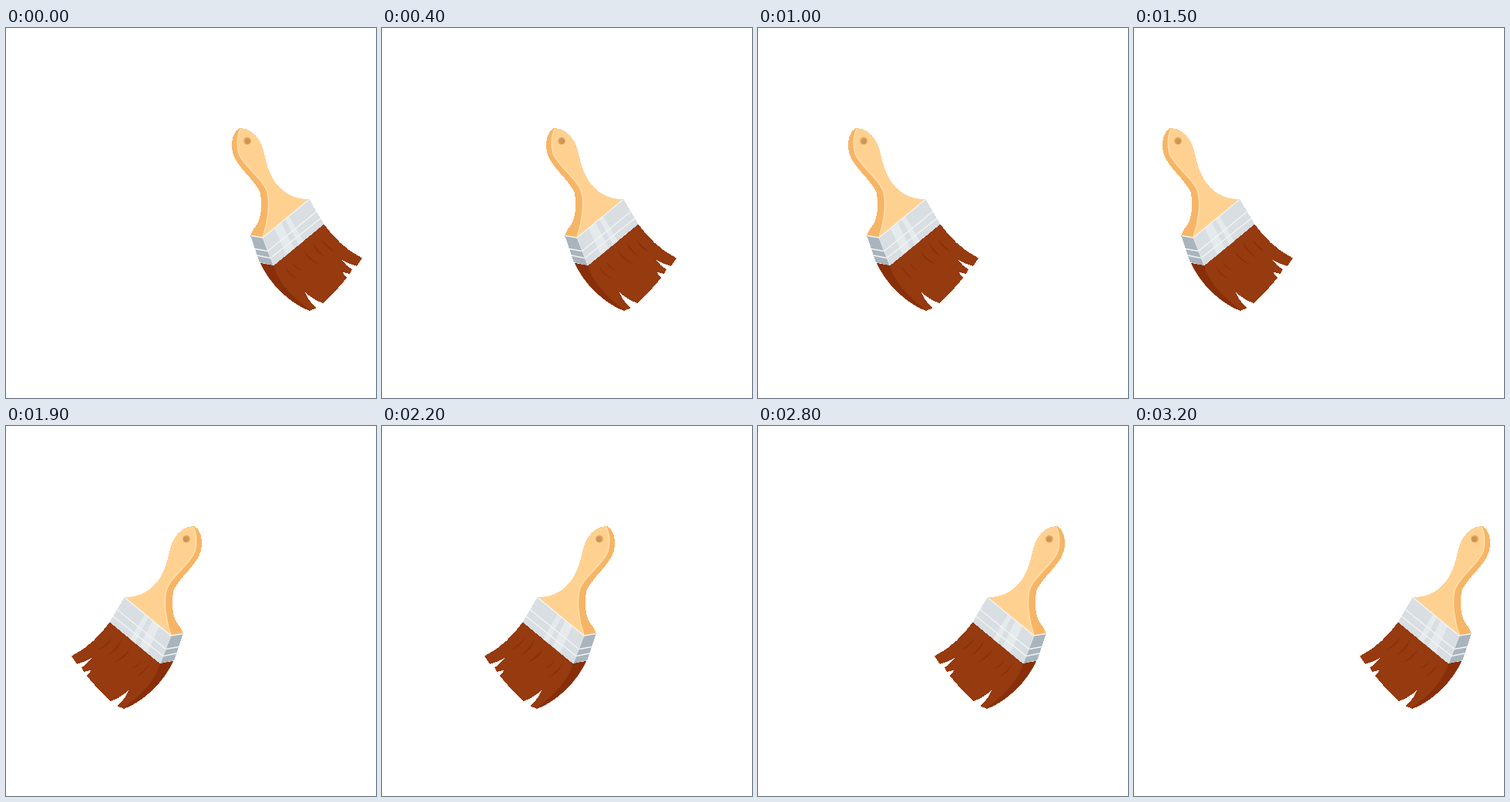
These frames come from a looping animation (480x480 px, 3.3 s). An HTML page:

```html
<!DOCTYPE html>
<html lang="en">
<head>
<meta charset="utf-8">
<title>Paintbrush</title>
<style>
  html, body { margin: 0; width: 100%; height: 100%; overflow: hidden; background: #fff; }
  svg { display: block; width: 100vw; height: 100vh; }
  .edge { shape-rendering: crispEdges; }
</style>
</head>
<body>
<svg viewBox="0 0 480 480">
  <g id="brush">
    <g id="bristles">
      <path class="edge" fill="#963a10" d="M330 305 L347 308 L412 254 C425 272 441 288 462 298.500 L455 309 Q444 306 435 300.500 Q441 308 449 313.500 L446 319 L436 316.500 L442 324 Q428 342 411 357 Q398 352 388 343 Q392 354 403 363 L394 367 C368 357 343 333 330 305Z"/>
      <path fill="#882f09" d="M330 305 L347 308 C353 330 371 348 395 366.500 C368 357 343 333 330 305Z"/>
      <path fill="#86300c" d="M361 308 Q368 319 379 326 Q366 321 361 308Z
        M371 303 Q375 310 385 315 Q374 312 371 303Z
        M386 289 Q394 299 407 307 Q392 302 386 289Z
        M397 277 Q404 289 415 298 Q401 291 397 277Z
        M410 274 Q417 284 428 291 Q414 286 410 274Z"/>
    </g>
    <g id="handle">
      <path class="edge" fill="#f6b566" d="M303 130 C295 133 292 146 293 156 C295 178 321 194 329.500 213 C333 226 331 242 328 250 C324 259 319 261 317 270 L333 272 L393 222 C374 223 357 213 347 197 C335 177 337 162 329 147 C323 136 313 129.500 303 130Z"/>
      <path fill="#ffd191" d="M304 130.500 C300 139 299 152 302 163 C309 180 333 195 339 213 C343 231 339 254 333 272 L393 222 C374 223 357 213 347 197 C335 177 337 162 329 147 C323 136 313 130.500 304 130.500Z"/>
      <path fill="none" stroke="#ffe0ae" stroke-width="1.500" d="M304 131 C300 139 299 152 302 163 C309 180 333 195 339 213 C343 231 339 254 333 271"/>
      <circle cx="313" cy="146.500" r="4.800" fill="#dca561"/>
      <circle cx="313.700" cy="147" r="3.300" fill="#cf9450"/>
    </g>
    <g id="ferrule">
      <path class="edge" fill="#a9b4bc" d="M317 269 L333 272 L347 308 L329 304Z"/>
      <path class="edge" fill="#d8dee2" d="M333 272 L393 221.500 L412.500 254.500 L347 308.500Z"/>
      <path fill="#e5eaed" d="M348 260 L357 252 L374 286 L364 294.500Z M362 248 L367 244 L386 276.500 L380 281.500Z"/>
      <g fill="none" stroke="#f2f5f6" stroke-width="1.500">
        <path d="M318 269.500 L333 272 L393 222.500"/>
        <path d="M323 286.500 L339.500 289.500 L403 238"/>
        <path d="M326 295 L343 298.500 L408 247"/>
      </g>
      <path fill="none" stroke="#e4e9ec" d="M333 272 L347 308"/>
    </g>
  </g>
</svg>
<script>
  const brush = document.getElementById('brush');
  const FRAME_MS = 100, FRAMES = 33, TURN = 16;
  const STEP = 16, START = 293, END = 37, MIRROR_SUM = 755;

  function draw(ms) {
    const frame = Math.floor(ms / FRAME_MS) % FRAMES;
    const flipped = frame >= TURN;
    // The first move to the left covers two steps.
    const left = flipped ? END + STEP * (frame - TURN)
      : frame ? START - STEP * (frame + 1) : START;
    const shift = left - START;
    brush.setAttribute('transform', flipped
      ? `translate(${MIRROR_SUM + shift} 0) scale(-1 1)`
      : `translate(${shift} 0)`);
  }

  const startTime = performance.now();
  function tick() {
    draw(performance.now() - startTime);
    requestAnimationFrame(tick);
  }
  draw(0);
  requestAnimationFrame(tick);
</script>
</body>
</html>
```
